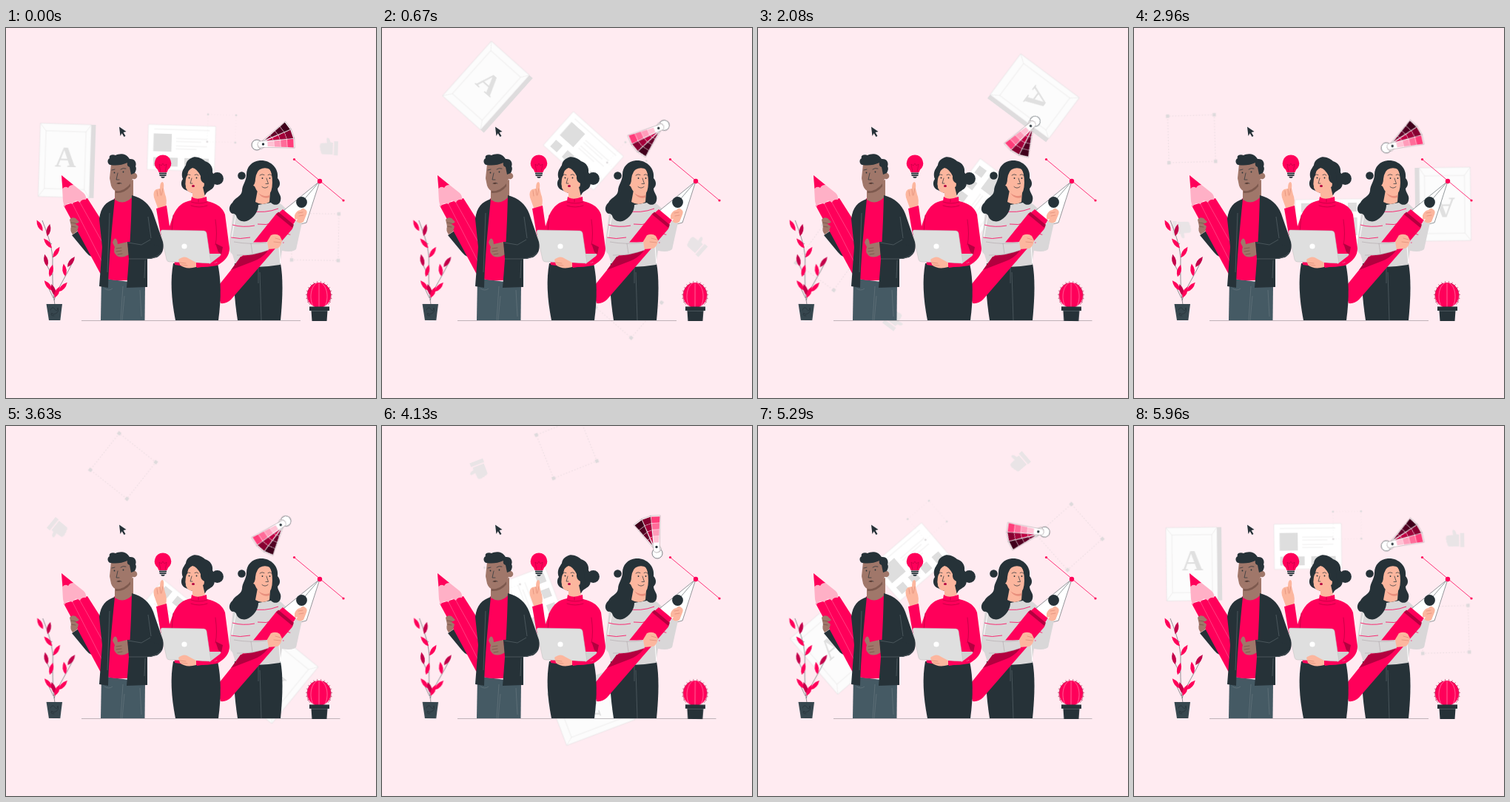
Animation, 500 px wide and 500 px high, one loop 6000 ms. Source, as an HTML page:

```html
<!DOCTYPE html>
<html lang="en">
<head>
<meta charset="utf-8">
<title>Design team</title>
<style>
html, body { margin: 0; width: 100%; height: 100%; overflow: hidden; background: #ffebf1; }
svg { display: block; width: 100vw; height: 100vh; }
.orbit { transform-origin: 249.3px 212.3px; animation: orbit 6s steps(144) -5ms infinite; }
.fan { transform-origin: 362.5px 148.5px; animation: turn 1.5s steps(36) -5ms infinite; }
.sway { animation: sway 3s ease-in-out infinite; }
.cactus { transform-origin: 423.5px 372px; }
.plant { transform-origin: 65px 385px; }
.floor-end { animation: show 6s step-end infinite; }
@keyframes orbit { from { transform: rotate(1.8deg); } to { transform: rotate(361.8deg); } }
@keyframes turn { to { transform: rotate(360deg); } }
@keyframes sway { 50% { transform: rotate(.8deg); } }
@keyframes show {
  0%, 43.5%, 91.5% { opacity: 0; }
  16%, 55% { opacity: 1; }
}
.ink { fill: #263238; }
.pink { fill: #ff005a; }
.wine { fill: #b3003f; }
.tan { fill: #a0776a; }
.peach { fill: #fcb69e; }
.knit { fill: #d9d7d8; }
.line { fill: none; stroke: #263238; stroke-width: .7; stroke-linecap: round; stroke-linejoin: round; }
.finger { fill: none; stroke: #d98370; stroke-width: .6; stroke-linecap: round; }
.deep { stroke: #6b4a40; }
.floor { fill: none; stroke: #6f6a70; stroke-width: .5; }
.fine { fill: none; stroke: #9a8f94; stroke-width: .4; }
.seam { fill: none; stroke: #7f8b91; stroke-width: .4; }
.crease { fill: none; stroke: #a8003a; stroke-width: .6; stroke-linecap: round; }
.glow { fill: none; stroke: #ff8bb0; stroke-width: .45; }
.ghost { fill: #dedadc; }
.dash { fill: none; stroke: #dcd3d7; stroke-width: .5; stroke-dasharray: 2 2; }
.edge { fill: none; stroke: #e4e2e3; stroke-width: .6; }
.letter { font: bold 40px "Liberation Serif", "Noto Serif", serif; fill: #e0e0e0; text-anchor: middle; }
</style>
</head>
<body>
<svg viewBox="0 0 500 500">
  <g class="orbit">
    <!-- framed letter -->
    <path d="M113 135H119V234H113Z" fill="#dedcdd"/>
    <path d="M44 135H113V234H44Z" fill="#fcfcfc" stroke="#e0dedf" stroke-width=".6"/>
    <path class="edge" d="M52 145H106V223H52ZM44 135L52 145M113 135L106 145M44 234L52 223M113 234L106 223"/>
    <text class="letter" x="79.500" y="193">A</text>
    <!-- article -->
    <path d="M190 132H281V193H190Z" fill="#fff" stroke="#e8e4e6" stroke-width=".7"/>
    <path d="M197.500 144H222V168H197.500Z" fill="#dedede"/>
    <path d="M198 176h12v12h-12zM219 176h12v12h-12zM240 176h12v12h-12zM261 176h12v12h-12z" fill="#dedede"/>
    <path class="edge" d="M198 138H273M228 150H270M228 154H262M228 160H270M228 164H256"/>
    <!-- small and large selections -->
    <path class="dash" d="M270 116H308V153H270Z" opacity=".3"/>
    <path class="ghost" d="M268.700 114.700h2.600v2.600h-2.600zM306.700 114.700h2.600v2.600h-2.600zM268.700 151.700h2.600v2.600h-2.600zM306.700 151.700h2.600v2.600h-2.600z"/>
    <g transform="rotate(-1 420 277)">
      <path class="dash" d="M388.500 245.500H451.500V308.500H388.500Z"/>
      <path class="ghost" d="M386.200 243.200h4.600v4.600h-4.600zM449.200 243.200h4.600v4.600h-4.600zM386.200 306.200h4.600v4.600h-4.600zM449.200 306.200h4.600v4.600h-4.600z"/>
    </g>
    <!-- thumb -->
    <path d="M441.500 147H447V166H441.500ZM440 149L436.500 148.500Q435.500 142 432 142.500Q430.500 143 432 149.500L425 150Q422 150.500 422.500 153Q421.500 155 423 157Q422 159.500 424 161Q424 165 427 165H440Z" fill="#e9e4e6"/>
  </g>

  <path class="floor" d="M102 395.400H398"/>
  <path class="floor floor-end" d="M398 395.400H451.500"/>

  <path class="ink" d="M153 133.500L162.500 140L158.600 141L161.500 146L159.500 147L156.600 142.300L154.500 146Z"/>

  <g id="fan" class="fan"></g>

  <g class="sway plant">
    <path d="M66 374C62 350 63 328 63 310C61 290 55 276 49 260M65 368C70 350 82 335 92 312M63 310L70 298M62 334L54 318M64 365L55 346M62 292L54 287" fill="none" stroke="#263238" stroke-width=".5"/>
    <g id="leaves" class="pink"></g>
    <path d="M54.500 373H76L73.300 395H58Z" fill="#37474f"/>
    <path class="line" d="M60 381Q63 375 66 380T70 378Q72 384 67 386T62 385Q59 389 65 389"/>
  </g>

  <g class="sway cactus">
    <g id="spikes" fill="none" stroke="#a8003a" stroke-width=".6"></g>
    <ellipse class="pink" cx="423" cy="361" rx="16" ry="17"/>
    <path d="M423 344V377M421 344C410 349 410 370 416 377M425 344C436 349 436 370 430 377" fill="none" stroke="#ffa6c2" stroke-width=".6"/>
    <path d="M418 345C404 351 405 368 411 374M428 345C442 351 441 368 435 374" fill="none" stroke="#a8003a" stroke-width=".5"/>
    <path class="ink" d="M410 376.500H437V382H434.500L433.500 396H413.500L412.500 382H410Z"/>
    <path class="seam" d="M413 382.500H434"/>
  </g>

  <!-- anchor handle -->
  <path d="M389.500 177.500L456 233" fill="none" stroke="#ff005a" stroke-width=".8"/>
  <g class="pink"><circle cx="389.500" cy="177.500" r="1.600"/><circle cx="456" cy="233" r="1.600"/></g>

  <!-- right-hand woman -->
  <g>
    <path class="ink" d="M309 318H371Q376 345 371 395H313Q306 350 309 318Z"/>
    <path class="seam" d="M343 330L345 395M341 324V345M314 326Q318 332 316 342"/>
    <path class="knit" d="M330 234C317 235 309 239 307 250L302 288Q300 302 306 306L311 322Q342 325 370 320L373 301Q388 304 392 298L399 262L386 252L374 240C370 236 363 234 357 234Z"/>
    <path d="M311 250L305 284M367 270L371 320" fill="none" stroke="#fff" stroke-width="1"/>
    <path d="M309 249Q318 252 326 250M330 247Q350 251 368 244M306 266Q320 270 336 267M340 265Q352 267 362 263M304 283Q316 286 330 283M372 276L394 282M374 290L391 293" fill="none" stroke="#ff005a" stroke-width=".8"/>
    <!-- hair behind the face -->
    <circle class="ink" cx="318.500" cy="199.500" r="5.300"/>
    <path class="ink" d="M343 179C332 180 325 188 325 198C325 207 319 212 319 220C318 228 309 229 306 236C300 241 301 249 306 251C309 250 311 253 312 256C315 262 324 263 329 259C337 254 341 246 341 239L358 236C363 241 370 239 371 233C373 226 367 223 367 217C372 212 370 206 367 203C369 189 357 178 343 179Z"/>
    <path class="peach" d="M340 219L357 222L356 235Q347 241 337 235Z"/>
    <path d="M341 223Q349 229 356 226L356 229Q347 232 341 223Z" fill="#e88f7d"/>
    <path class="peach" d="M337 196Q346 186 357 191Q361 202 359.500 215Q358 227 350 227Q340 225 336 214Q331 212 332 206Q334 202 337 204Z"/>
    <path class="ink" d="M341 181Q353 184 360 197L361 208Q365 200 361 189Q353 180 341 181ZM347 187Q338 193 337 204Q337 211 333 214L328 206Q328 188 345 185Z"/>
    <path class="line" d="M343 199Q346 196.500 349 198.500M354 198.500Q356 196.500 359 199M352 203L354.500 210.500H351M346 214.500Q350 218 354 214.500"/>
    <circle class="ink" cx="346.500" cy="203" r=".9"/><circle class="ink" cx="356.500" cy="203" r=".9"/>
    <!-- big pen -->
    <path class="pink" d="M366 250L390 268L304 367Q298 373 290 372L284 352Z"/>
    <path class="wine" d="M317 309L354 301Q346 311 335 315L304 327Z"/>
    <path d="M376 246L424 207L406 263L390 267L373 253Z" fill="#fff" stroke="#263238" stroke-width=".5"/>
    <path class="line" d="M424 207L400 235" style="stroke-width:.5"/>
    <circle class="ink" cx="399.500" cy="235.500" r="7.400"/>
    <path class="pink" d="M374 245L392 260L386 268L366 252Z"/>
    <path class="wine" d="M368 248.500L389 266L387 270L365 252Z"/>
    <!-- hands -->
    <path class="peach" d="M390 253Q393 246 398 246Q401 242 404 245Q408 247 406 252L402 262Q396 266 391 263L394 258L390 259Z"/>
    <path class="finger" d="M395 250L401 249M396 254L402 253"/>
    <path class="knit" d="M391 260Q396 265 400 263L392 299Q388 303 372 300L373 292L382 286Z"/>
    <path class="peach" d="M352 290L358 280Q365 277 370 281L373 287Q372 296 366 298L354 299Z"/>
    <path class="finger" d="M364 284L371 286M362 289L371 290"/>
    <path class="knit" d="M303 285Q317 291 353 289L355 300Q331 309 311 307Q299 306 303 285Z"/>
    <path class="fine" d="M308 289Q330 293 352 290M312 307Q333 308 355 300M331 291L333 305"/>
  </g>
  <circle class="pink" cx="424" cy="207" r="3.200"/>

  <!-- woman with laptop -->
  <g>
    <path class="ink" d="M226 318H286Q293 350 287 395H229Q220 350 226 318Z"/>
    <path class="peach" d="M205 243L200 229Q198 221 203 218L208 217Q208 209 211 208Q214 208 213 217L215 225Q218 231 216 243Z"/>
    <path class="finger" d="M204 220L205 227M208 218L209 226M212 217L210 226"/>
    <path class="pink" d="M250 233C239 235 232 240 226 253L221 268L217 240L203 244L209 279Q214 289 224 284L228 320Q258 326 285 321Q302 312 302 298L296 252Q291 238 272 234Z"/>
    <path class="pink" d="M251 228Q261 231 271 228L272 240Q261 245 249 239Z"/>
    <path class="crease" d="M250 235Q261 239 272 235M250 240Q261 244 272 240M226 253L224 276M283 259Q286 280 283 293M260 229V235"/>
    <circle class="ink" cx="285.500" cy="203.500" r="8.400"/>
    <path class="ink" d="M250 176C256 172 264 176 269 180C276 182 280 188 279 195C283 201 283 208 281 214C278 220 272 219 269 226L258 226L243 219C237 217 235 209 239 204C236 197 239 190 243 187C243 181 246 178 250 176Z"/>
    <path class="peach" d="M243 199Q247 189 254 187Q262 191 265 204Q270 204 270 210Q269 214 266 215L269 228Q260 233 252 229L252 223Q243 222 242 211Z"/>
    <path class="ink" d="M245 183Q254 177 264 184Q275 192 274 207Q279 215 272 220Q266 219 268 210Q262 207 263 200Q258 190 252 189Q246 191 245 199Q241 205 243 216Q236 210 240 203Q237 191 245 183Z"/>
    <path class="line" d="M244.500 199Q246 197 249 198.500M255 198.500Q258 196.500 260 199M251 203L249 210H252"/>
    <circle class="ink" cx="247.500" cy="202.500" r=".9"/><circle class="ink" cx="257.500" cy="202.500" r=".9"/>
    <ellipse cx="253" cy="213.500" rx="2" ry="1.500" fill="#b3003f"/>
    <!-- laptop -->
    <path d="M274 305H291L285 317L275 319Z" fill="#d0d0d0"/>
    <path d="M211 273L267 274Q270 274 271 277L277 318L221 316Q218 316 217 313L209 276Q209 273 211 273Z" fill="#dfdfdf" stroke="#bdbdbd" stroke-width=".5"/>
    <circle cx="241" cy="295" r="3.600" fill="#fff"/>
    <path class="wine" d="M283 291L293 296L291 306L287 303Z"/>
    <path class="pink" d="M301 293Q303 304 294 311Q280 321 258 324L256 317L275 319L292 306Z"/>
    <path class="peach" d="M233 313Q239 308 244 310L257 317V323Q243 327 235 320Z"/>
    <path class="finger" d="M235 317L243 318M237 320L245 321"/>
  </g>

  <!-- bulb -->
  <path class="pink" d="M212 171.500A11.300 11.300 0 0 1 219 191.500L217.500 195H206.500L205 191.500A11.300 11.300 0 0 1 212 171.500Z"/>
  <path d="M209 195L207 184L210 186L212 183L214 186L217 184L215 195" fill="none" stroke="#a8003a" stroke-width=".5"/>
  <path class="ink" d="M207 195.500h10v2h-10zM207.500 198.200h9v1.800h-9zM209 200.700h6l-1.500 2h-3z"/>

  <!-- man -->
  <g>
    <path d="M129 338L188 346L187.500 395H128Z" fill="#455a64"/>
    <path class="seam" d="M158 349L155 395M160 362L157 395M133 352Q139 356 144 352M181 354L183 390"/>
    <path class="ink" d="M89 280L98 274L128 304V312Q114 311 108 303Z"/>
    <!-- pencil -->
    <path class="pink" d="M78 240L110 230L138 274V344L127 331Z"/>
    <path d="M75 199L105 223Q109 227 108 232Q102 231 100 236Q94 230 90 238Q82 235 79 242L77 234Z" fill="#ffb0c6"/>
    <path class="pink" d="M75 199L91 212Q86 212 84 216Q80 213 76.500 217Z"/>
    <path class="glow" d="M90 238L136 328M100 236L136 300"/>
    <path class="tan" d="M86 259Q88 255 94 257L99 262Q96 265 93 264L98 268L96 275L90 279Q86 274 88 268Z"/>
    <path class="finger deep" d="M88 263L94 264M88 268L94 269"/>
    <path class="pink" d="M146 230Q157 239 170 226L170 340Q152 343 136 339Z"/>
    <path class="tan" d="M147 214L172 205L172 227Q160 241 147 232Z"/>
    <path d="M148 219Q160 219 168 209L168 214Q160 224 148 223Z" fill="#7d594e"/>
    <path class="tan" d="M142 184L168 181L171 204Q167 216 154 220Q145 222 142 213L140 203Z"/>
    <circle class="tan" cx="173" cy="200" r="4.300"/>
    <path class="ink" d="M141 185C137 184 136 178 140 176C138 172 144 170 148 172C153 169 163 169 167 177C174 176 177 182 175 187C177 190 175 194 174 196L169 198L167 188Q163 187 164 182Q153 187 141 185Z"/>
    <path class="line" d="M143 192L147 191M155 191Q158 188.500 162 190M151 196L149 205H153M150 210Q153 208 156 210"/>
    <circle class="ink" cx="146.500" cy="195.500" r=".9"/><circle class="ink" cx="158.500" cy="194.500" r=".9"/>
    <ellipse cx="152.500" cy="210" rx="2" ry="1" fill="#5d3d35"/>
    <!-- jacket -->
    <path class="ink" d="M147 231C135 235 128 242 126 258L130 296L126 349L138 351C139 312 143 270 147 231Z"/>
    <path class="ink" d="M170 226C185 230 194 238 199 251L212 289Q215 304 204 310L191 312L191 350L163 351C167 305 169 270 170 226Z"/>
    <path class="tan" d="M144 290Q146 283 149 285Q151 288 151 292L164 289L166 306Q157 312 150 308Q144 303 147 296Z"/>
    <path class="finger deep" d="M149 298L156 297M149 302L156 301M151 306L157 305"/>
    <path class="ink" d="M164 289L190 289L208 296Q210 309 196 312L166 312Z"/>
    <path class="seam" d="M166 312H190Q205 311 210 303M165 290L183 293L195 286M192 255L196 284M140 250L137 330M188 314L187 338"/>
  </g>
</svg>
<script>
const add = (id, markup) => { document.getElementById(id).innerHTML += markup; };

// Swatch fan: three cards pinned at one point
const cards = [
  [-37, ['#7d0030', '#66002a', '#520022', '#40001b']],
  [-19.5, ['#d60049', '#c00043', '#a3003a', '#870031']],
  [-2, ['#ffc2d4', '#ff9cba', '#ff6c99', '#ff3d7a']]
];
add('fan', '<circle cx="339" cy="158" r="7" fill="#fff" stroke="#263238" stroke-width=".6"/>');
for (const [angle, tones] of cards) {
  const half = x => 2.8 + x * .075;
  const cells = tones.map((tone, i) => {
    const x = 6 + i * 8.9, end = x + 8.4;
    return `<path d="M${x} ${-half(x)}L${end} ${-half(end)}V${half(end)}L${x} ${half(x)}Z" fill="${tone}"/>`;
  }).join('');
  add('fan', `<g transform="translate(347.500 157) rotate(${angle})">
    <path d="M-6 -4L42.500 -6.600V6.600L-6 4Q-9 0 -6 -4Z" fill="#fff" stroke="#8f858a" stroke-width=".4"/>${cells}</g>`);
}
add('fan', '<circle class="ink" cx="347.500" cy="157" r="1.700"/>');

// Leaves: x, y, tilt
[[45.500, 267, -28], [57.500, 273, 12], [56.500, 291, -40], [68, 303, 32], [54, 314, -12], [61, 328, 14],
 [79, 327, -8], [88, 316, 35], [57, 348, -38], [77, 350, 42], [64, 354, -18], [69, 357, 25]].forEach(([x, y, tilt], i) =>
  add('leaves', `<path transform="translate(${x} ${y}) rotate(${tilt})" d="M0 -8.500Q5.500 1 0 8.500Q-5.500 1 0 -8.500Z" ${i % 3 == 1 ? 'fill="#c4004a"' : ''}/>`));

for (let a = 150; a <= 390; a += 16) {
  const c = Math.cos(a * Math.PI / 180), s = Math.sin(a * Math.PI / 180);
  add('spikes', `<path d="M${423 + 15 * c} ${361 + 16 * s}L${423 + 18 * c} ${361 + 19 * s}"/>`);
}
</script>
</body>
</html>
```
